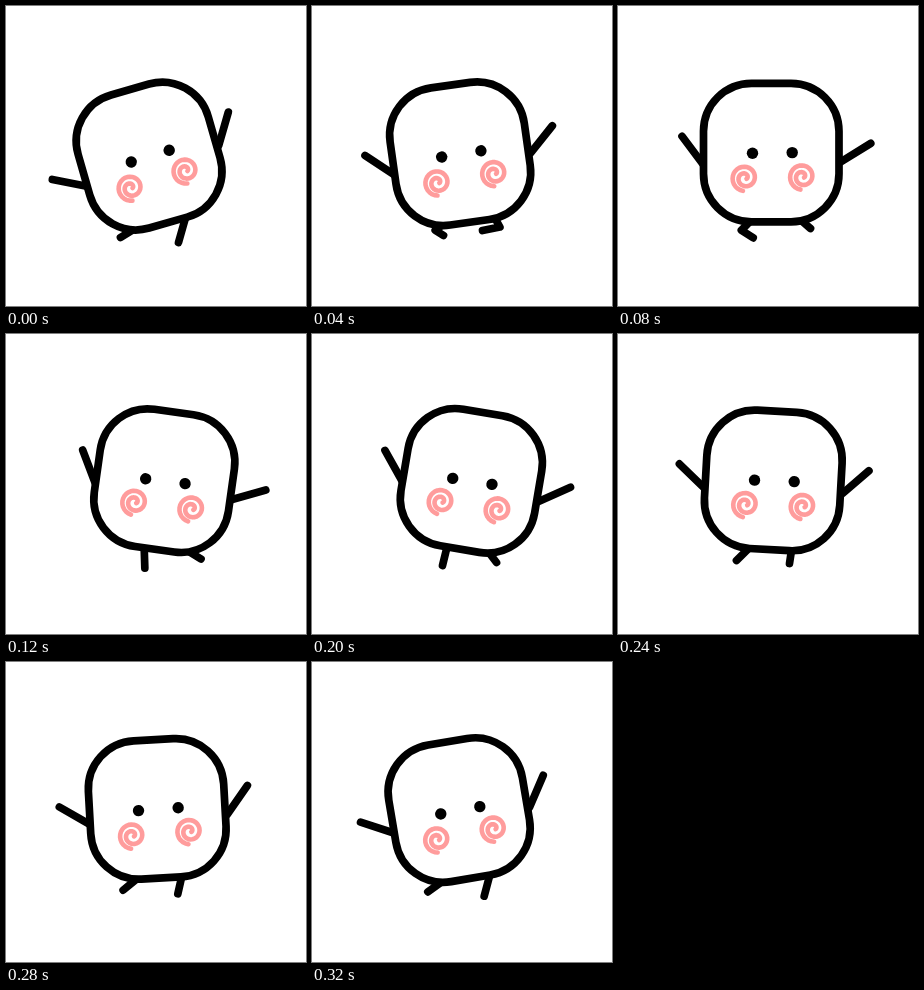
Recreate the animation shown at these times as an HTML page with a canvas. Size 300 px wide and 300 px high, loop 360 ms.

```html
<!DOCTYPE html>
<html lang="en">
<head>
<meta charset="utf-8">
<title>Dancing marshmallow</title>
<style>
  html, body { margin: 0; width: 100%; height: 100%; overflow: hidden; background: #fff; }
  canvas { display: block; width: 100vw; height: 100vh; }
</style>
</head>
<body>
<canvas width="300" height="300"></canvas>
<script>
const ctx = document.querySelector('canvas').getContext('2d');
const STEP_MS = 40, STEPS = 9, RISE_STEPS = 4;
const ARM_LENGTH = 35;
const radians = degrees => degrees * Math.PI / 180;

// Feet follow a few [step, x, y] key points; knees bend outward in the first steps.
const legs = [
  { side: -1, hip: [-12, 60], bendSteps: 3, bend: 17,
    foot: [[0, 114, 231], [1, 131, 229], [4, 142, 236], [6, 118, 226], [9, 114, 231]] },
  { side: 1, hip: [23, 62], bendSteps: 2, bend: 13,
    foot: [[0, 172, 236], [1, 170, 224], [2, 192, 222], [4, 197, 227], [6, 171, 229], [9, 172, 236]] }
];

function footAt(keys, step) {
  const i = keys.findIndex(key => key[0] > step);
  const [t0, x0, y0] = keys[i - 1], [t1, x1, y1] = keys[i];
  const mix = (step - t0) / (t1 - t0);
  return [x0 + (x1 - x0) * mix, y0 + (y1 - y0) * mix];
}

function polyline(points) {
  ctx.beginPath();
  points.forEach(([x, y]) => ctx.lineTo(x, y));
  ctx.stroke();
}

function drawArm(shoulder, side, raise) {
  const [x, y] = shoulder, angle = radians(raise);
  polyline([shoulder, [x + side * ARM_LENGTH * Math.cos(angle), y - ARM_LENGTH * Math.sin(angle)]]);
}

function drawLeg({ side, bendSteps, bend, foot }, hip, step) {
  const [footX, footY] = footAt(foot, step);
  const bent = step < bendSteps ? Math.sin(Math.PI * step / bendSteps) : 0;
  const knee = [(hip[0] + footX) / 2 + side * bend * bent, (hip[1] + footY) / 2 + 6 * bent];
  polyline([hip, knee, [footX, footY]]);
}

function drawEye(x, y) {
  ctx.beginPath();
  ctx.arc(x, y, 5.7, 0, Math.PI * 2);
  ctx.fill();
}

// Winds clockwise inward from the bottom.
function drawCheek(x, y) {
  const points = [];
  for (let i = 0; i <= 50; i++) {
    const t = i / 50;
    const angle = Math.PI * (0.55 + 3.6 * t), radius = 13 - 11.3 * t ** 1.4;
    points.push([x + radius * Math.cos(angle), y + radius * Math.sin(angle)]);
  }
  polyline(points);
}

function drawBody(x, y, tilt) {
  ctx.save();
  ctx.translate(x, y);
  ctx.rotate(radians(tilt));
  ctx.beginPath();
  ctx.roundRect(-67.5, -69, 135.5, 138.5, 48);
  ctx.fillStyle = '#fff';
  ctx.fill();
  ctx.stroke();

  ctx.fillStyle = '#000';
  drawEye(-18.5, 1);
  drawEye(21.2, 0.3);
  ctx.strokeStyle = '#ff9c9c';
  ctx.lineWidth = 4.6;
  drawCheek(-26, 25.7);
  drawCheek(31.5, 24.4);
  ctx.restore();
}

function draw(step) {
  // Sways right in four steps and back in five; the arms ease out of each end.
  const rising = step < RISE_STEPS;
  const progress = rising ? step / RISE_STEPS : (step - RISE_STEPS) / (STEPS - RISE_STEPS);
  const eased = 1 - (1 - progress) ** 1.4;
  const tilt = 16 * (rising ? 2 * progress - 1 : 1 - 2 * progress);
  const raise = 11 + 68 * (rising ? eased : 1 - eased);

  const x = 152.5 + 0.64 * tilt, y = 145.8 - 0.07 * tilt + 0.0096 * tilt * tilt;
  const cos = Math.cos(radians(tilt)), sin = Math.sin(radians(tilt));
  const onBody = (u, v) => [x + u * cos - v * sin, y + u * sin + v * cos];

  ctx.clearRect(0, 0, 300, 300);
  ctx.save();
  ctx.translate(0.5, 0.5);
  ctx.lineCap = ctx.lineJoin = 'round';
  ctx.strokeStyle = '#000';
  ctx.lineWidth = 7.7;
  drawArm(onBody(-68, 12), -1, raise);
  drawArm(onBody(70, 9.5), 1, 85 - raise);
  for (const leg of legs) drawLeg(leg, onBody(...leg.hip), step);
  drawBody(x, y, tilt);
  ctx.restore();
}

function tick() {
  draw(Math.floor(performance.now() / STEP_MS) % STEPS);
  requestAnimationFrame(tick);
}
tick();
</script>
</body>
</html>
```
